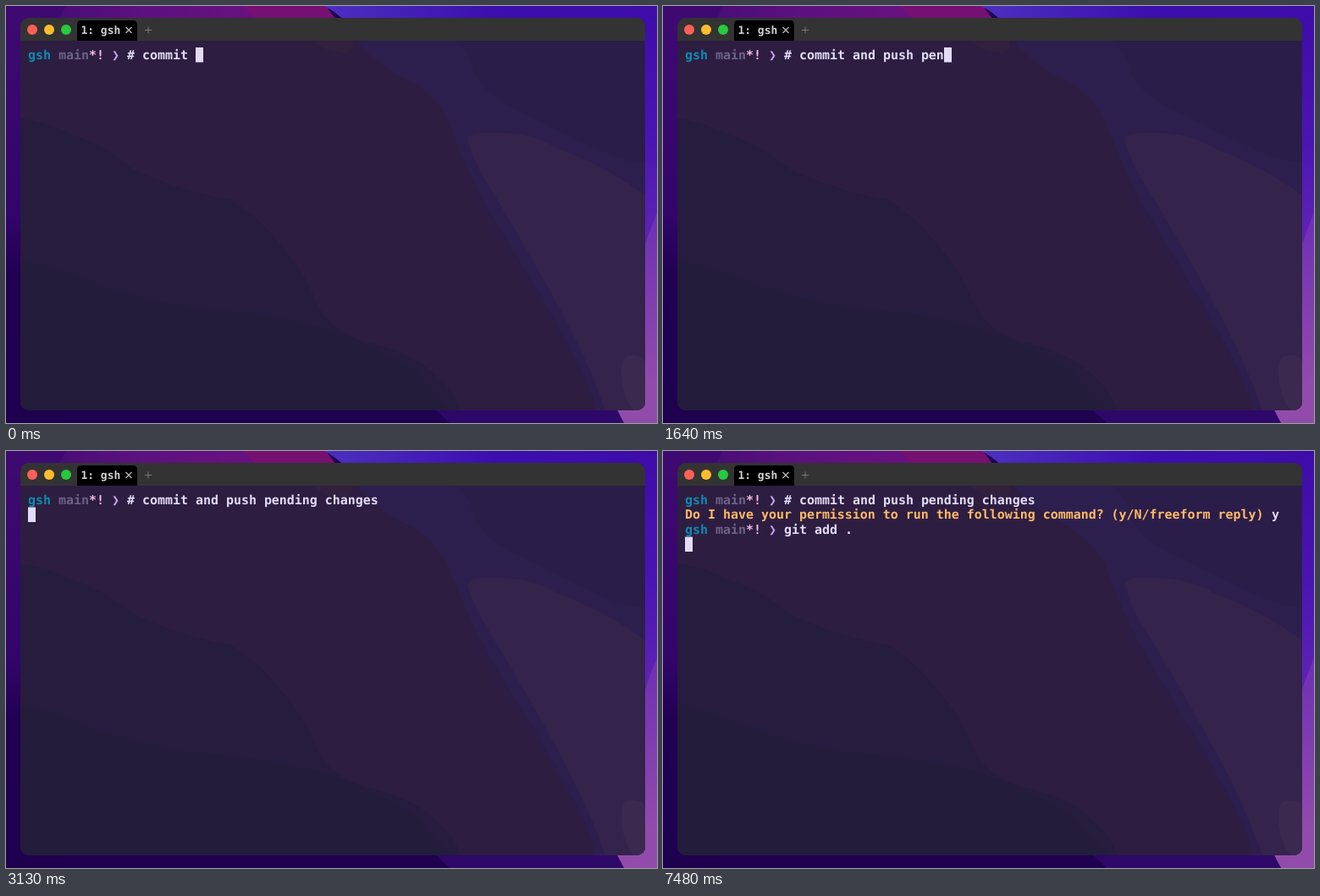
An HTML page for the animation above (8 s loop, 769 by 493 pixels).

```html
<!DOCTYPE html>
<html lang="en">
<head>
<meta charset="utf-8">
<title>Terminal</title>
<style>
  html, body { margin: 0; width: 100%; height: 100%; overflow: hidden; background: #210052; }
  svg { display: block; width: 769px; height: 493px; }
  text { font-family: "DejaVu Sans Mono", monospace; font-weight: bold; white-space: pre; text-rendering: geometricPrecision; }
  #term text { font-size: 14.949px; }
</style>
</head>
<body>
<svg viewBox="0 0 769 493" xmlns="http://www.w3.org/2000/svg">
  <defs>
    <linearGradient id="left" x2="0" y2="1">
      <stop offset="0" stop-color="#3e0a72"/>
      <stop offset=".5" stop-color="#32056a"/>
      <stop offset=".64" stop-color="#210052"/>
      <stop offset="1" stop-color="#1f004f"/>
    </linearGradient>
    <linearGradient id="right" x2="0" y2="1">
      <stop offset="0" stop-color="#3d0ca8"/>
      <stop offset=".3" stop-color="#4a14b2"/>
      <stop offset=".55" stop-color="#5f22b4"/>
      <stop offset="1" stop-color="#6a2cae"/>
    </linearGradient>
    <linearGradient id="pink" x2="0" y2="1">
      <stop offset="0" stop-color="#6d30b4"/>
      <stop offset="1" stop-color="#9a50aa"/>
    </linearGradient>
    <linearGradient id="top">
      <stop offset="0" stop-color="#3d0a70"/>
      <stop offset=".5" stop-color="#5a117e"/>
      <stop offset="1" stop-color="#6a1180"/>
    </linearGradient>
    <linearGradient id="blue">
      <stop offset="0" stop-color="#4c30c0"/>
      <stop offset=".5" stop-color="#3c0fae"/>
      <stop offset="1" stop-color="#3d0ca8"/>
    </linearGradient>
    <clipPath id="win"><rect x="17" y="14" width="738" height="464" rx="10"/></clipPath>
  </defs>

  <!-- wallpaper -->
  <rect width="769" height="493" fill="#1f0050"/>
  <rect width="60" height="493" fill="url(#left)"/>
  <rect width="300" height="30" fill="url(#top)"/>
  <path d="M0 0H70L56 30H0Z" fill="#3e0a72"/>
  <path d="M280 0H378L400 30H310Z" fill="#761172"/>
  <path d="M376 0H769V30H410Q396 10 376 0Z" fill="url(#blue)"/>
  <rect x="740" width="29" height="493" fill="url(#right)"/>
  <path d="M769 245Q758 270 750 300V493H769Z" fill="url(#pink)"/>
  <path d="M500 470L524 493H735V470Z" fill="#2e0869"/>
  <path d="M718 470L730 493H769V440Z" fill="#914cab"/>

  <!-- window -->
  <g clip-path="url(#win)">
    <rect x="17" y="14" width="738" height="464" fill="#2d1d41"/>
    <path d="M17 133Q50 137 80 153Q120 166 150 193Q210 220 265 229Q300 250 322 280Q352 312 366 350Q384 386 425 397Q482 410 508 437Q530 455 537 478H17Z" fill="#261c3e"/>
    <path d="M17 300Q70 311 110 330Q180 354 250 359Q330 366 390 386Q440 404 480 428L525 478H17Z" fill="#241c3b"/>
    <path d="M362 41Q380 56 400 55Q412 52 409 41Z" fill="#33203f"/>
    <path d="M415 41Q432 66 480 90Q514 111 526 144Q552 214 594 280Q650 370 678 425Q692 450 697 478H755V41Z" fill="#2d1f4d"/>
    <path d="M530 41Q550 57 552 78Q566 108 610 126Q660 152 700 170Q730 185 755 185V41Z" fill="#2b1d49"/>
    <path d="M546 160Q544 150 565 150Q620 148 650 168Q710 190 755 224V478H708Q690 424 650 350Q600 260 565 204Q550 178 546 160Z" fill="#34234b"/>
    <path d="M543 205Q590 290 640 362Q680 425 692 458M553 212Q602 290 652 374" fill="none" stroke="#29205a" stroke-width="1.4" opacity=".65"/>
    <path d="M727 430Q727 413 739 413Q755 412 755 424V478H741Q727 460 727 430Z" fill="#3b2950"/>
    <rect x="17" y="14" width="738" height="27" fill="#333"/>
    <path d="M84 41V22Q84 17 89 17H150Q155 17 155 22V41Z" fill="#000"/>
  </g>
  <circle cx="31" cy="28" r="6" fill="#ff5f57"/>
  <circle cx="51" cy="28" r="6" fill="#febc2e"/>
  <circle cx="71" cy="28" r="6" fill="#28c840"/>
  <text x="88.5" y="33" font-size="12.95" fill="#d2d2d2">1: gsh</text>
  <path d="M141.5 25L148.5 32M148.5 25L141.5 32" stroke="#c4c4c4" stroke-width="1.1"/>
  <path d="M164 28.5H172M168 24.5V32.5" stroke="#7a7a7a" stroke-width="1"/>

  <g id="term"></g>
</svg>
<script>
const NS = "http://www.w3.org/2000/svg";
const term = document.getElementById("term");
const LOOP = 8000, COL = 9, ROW = 17.5, LEFT = 26, TOP = 49;
const INK = "#e2dcf8", ORANGE = "#ffba67";
const ENTER = 3130, ASK = 4630, REPLY = 6730, RUN = 7480;

const request = "# commit and push pending changes";
// time, characters typed
const typing = [
  [0, 9], [150, 11], [300, 12], [450, 13], [890, 14], [1040, 15], [1190, 17],
  [1340, 18], [1490, 19], [1640, 21], [1790, 23], [1940, 25], [2090, 26],
  [2240, 28], [2390, 30], [2540, 31], [2680, 33]
];

const colX = col => LEFT + col * COL;
const rowY = row => TOP + row * ROW;

function add(parent, tag, attrs) {
  const el = document.createElementNS(NS, tag);
  for (const key in attrs) el.setAttribute(key, attrs[key]);
  return parent.appendChild(el);
}

function write(parent, col, row, fill, str) {
  const el = add(parent, "text", { x: colX(col), y: Math.floor(rowY(row) + 14), fill });
  el.textContent = str;
  return el;
}

function prompt(parent, row) {
  write(parent, 0, row, "#0d8cae", "gsh");
  write(parent, 4, row, "#6c6386", "main");
  write(parent, 8, row, "#f3bce3", "*!");
  write(parent, 11, row, "#c9a2f3", "❯");
  return write(parent, 13, row, INK, "");
}

const typed = prompt(term, 0);

const question = add(term, "g", {});
write(question, 0, 1, ORANGE, "Do I have your permission to run the following command? (y/N/freeform reply)");
const answer = write(question, 77, 1, INK, "y");

const box = add(term, "g", {});
add(box, "rect", {
  x: 30.5, y: 92.5, width: 711, height: 70, rx: 3,
  fill: "none", stroke: "#12607f", "stroke-width": 1
});
write(box, 1, 3, INK, "git add .");
write(box, 1, 5, INK, "Stage all changes for commit.");

const run = add(term, "g", {});
prompt(run, 2).textContent = "git add .";

const cursor = add(term, "rect", { width: COL, height: 17.5, fill: "#e2dcfa" });

const show = (el, on) => el.setAttribute("visibility", on ? "visible" : "hidden");

function cursorCell(t, count) {
  if (t < ENTER) return [13 + count, 0];
  if (t < ASK) return [0, 1];
  if (t < REPLY) return [77, 1];
  if (t < RUN) return [78, 1];
  return [0, 3];
}

function render(t) {
  const count = typing.filter(step => step[0] <= t).pop()[1];
  const str = request.slice(0, count);
  if (typed.textContent !== str) typed.textContent = str;
  show(question, t >= ASK);
  show(answer, t >= REPLY);
  show(box, t >= ASK && t < RUN);
  show(run, t >= RUN);
  const [col, row] = cursorCell(t, count);
  cursor.setAttribute("x", colX(col));
  cursor.setAttribute("y", rowY(row));
}

const start = performance.now();
function tick() {
  render((performance.now() - start) % LOOP);
  requestAnimationFrame(tick);
}
tick();
</script>
</body>
</html>
```
